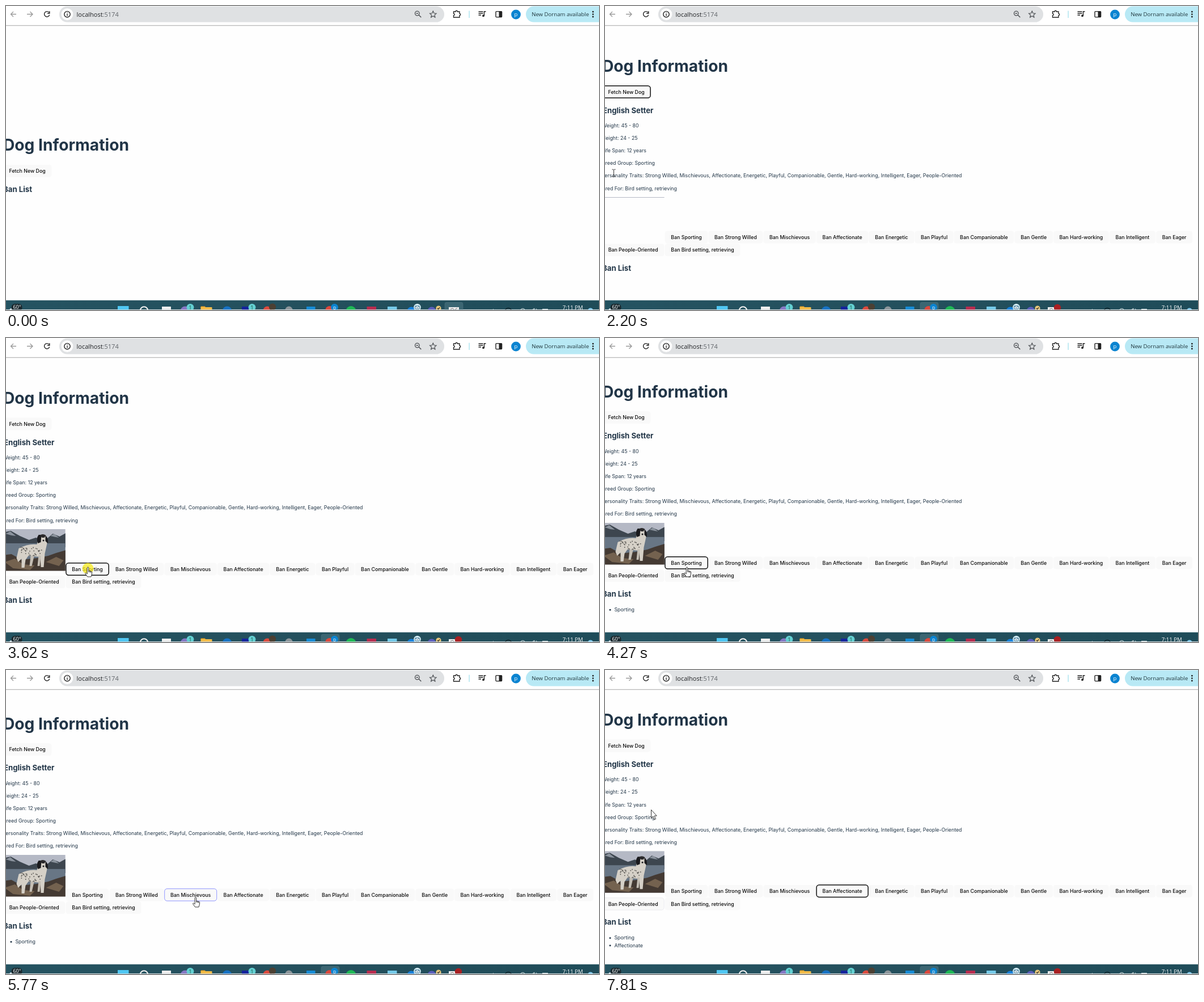
An HTML page that plays this animation: 1046 by 536 pixels, repeating every 8 s.

```html
<!DOCTYPE html>
<html lang="en">
<head>
<meta charset="utf-8">
<title>Dog Information</title>
<style>
  html, body { margin: 0; width: 100%; height: 100%; overflow: hidden; background: #fefefe; }
  svg { display: block; }
  text { font-family: Inter, sans-serif; }
  .ui text { font-family: "Open Sans", "Noto Sans", sans-serif; }
  .page text { font-size: 8.82px; fill: #213547; }
  .page .h1 { font-size: 28.2px; font-weight: 700; }
  .page .h2 { font-size: 13.2px; font-weight: 700; }
  .page .button text { font-weight: 500; fill: #0c0c0c; text-anchor: middle; }
  .end { text-anchor: end; }
  .mid { text-anchor: middle; }
  .line { fill: none; stroke: #222; stroke-width: 1.4; }
</style>
</head>
<body>
<svg id="stage" width="1046" height="536" viewBox="0 0 1046 536"></svg>
<script>
const LOOP = 8000;
const rect = (x, y, w, h, fill, rx = 0, more = '') =>
  `<rect x="${x}" y="${y}" width="${w}" height="${h}" fill="${fill}" rx="${rx}" ${more}/>`;
const disc = (x, y, r, fill, more = '') => `<circle cx="${x}" cy="${y}" r="${r}" fill="${fill}" ${more}/>`;
const text = (x, y, str, cls = '', more = '') => `<text x="${x}" y="${y}" class="${cls}" ${more}>${str}</text>`;
const path = (d, more = 'class="line"') => `<path d="${d}" ${more}/>`;

// Buttons: left, right, vertical centre, label
const buttons = [[-5.5, 80.8, 151.4, 'Fetch New Dog']];
const edges = [105.2, 181.9, 279, 372.4, 464.8, 546, 615, 721.8, 790.6, 889.2, 971.6, 1036.6];
const traits = ['Strong Willed', 'Mischievous', 'Affectionate', 'Energetic', 'Playful', 'Companionable',
  'Gentle', 'Hard-working', 'Intelligent', 'Eager', 'People-Oriented'];
['Sporting', ...traits.slice(0, -1)].forEach((name, i) =>
  buttons.push([edges[i], edges[i + 1], 407.5, 'Ban ' + name]));
buttons.push([-5.5, 104.8, 430.2, 'Ban People-Oriented']);
buttons.push([105.2, 239, 430.2, 'Ban Bird setting, retrieving']);
const FETCH = 0, SPORTING = 1, AFFECTIONATE = 4, PEOPLE = 12;

// Paragraphs: right end, text
const facts = [
  [59.5, 'Weight: 45 - 80'], [57.5, 'Height: 24 - 25'], [73, 'Life Span: 12 years'],
  [88, 'Breed Group: Sporting'], [629.5, 'Personality Traits: ' + traits.join(', ')],
  [127, 'Bred For: Bird setting, retrieving']
];
const factY = i => 211 + i * 22.06;

const buttonMarkup = ([x0, x1, y, label]) => `<g class="button">
  ${rect(x0 + .4, y - 11, x1 - x0 - .8, 22, '#f9f9f9', 4.4)}
  ${text((x0 + x1) / 2, y + 3.2, label)}</g>`;

function photo() {
  let spots = '';
  for (let i = 0; i < 34; i++) {
    const a = Math.sin(i * 12.99) * 43758.5, b = Math.sin(i * 78.23) * 12543.7;
    spots += disc(32 + (a - Math.floor(a)) * 37, 32 + (b - Math.floor(b)) * 15, .9, '#55534f');
  }
  return rect(0, 0, 110.3, 73.6, '#b5b9c5') +
    path('M0 6L14 3 30 12 46 19 58 15 74 20 88 8 100 13 111 7V32H0Z', 'fill="#3d464f"') +
    path('M5 8l8-4 10 8-8-1ZM84 12l6-4 9 7-6-1Z', 'fill="#8a929c"') +
    rect(0, 25, 110.3, 33, '#687685') +
    path('M0 46L15 44 33 54 60 51 80 47 94 42 111 37V74H0Z', 'fill="#443a33"') +
    path('M3 58l18-6 15 10 20 2-8 8-30-3ZM76 58l18-9 13 6-8 10Z', 'fill="#74624f"') +
    path('M28 34Q45 25 60 27L64 12Q70 6 77 13L78 25 74 43 72 67H67L66 49 45 47 40 54 38 68H33L33 52 27 58 24 51Z',
      'fill="#d5d0c7"') + spots +
    path('M49 47L47 65H51L55 48ZM63 46L61 65H65L67 47Z', 'fill="#c4beb4"') +
    path('M63 10Q58 17 62 25L67 23 68 10ZM75 11Q81 16 79 25L75 21Z', 'fill="#1a1a1d"') +
    path('M65 11Q70 7 76 11L73 15 69 15Z', 'fill="#2a292b"') + disc(71.5, 20, 1.5, '#1a1a1d');
}

const pageMarkup = `<g class="page" id="page">
  ${text(217, 116, 'Dog Information', 'h1 end')}
  ${buttonMarkup(buttons[FETCH])}
  <g id="details">
    ${text(85.5, 188.6, 'English Setter', 'h2 end')}
    ${facts.map(([x, str], i) => text(x, factY(i) + 3.2, str, 'end')).join('')}
    <clipPath id="loaded"><rect id="loadedRect" width="110.3" height="1"/></clipPath>
    <g transform="translate(-5.5 337)"><g clip-path="url(#loaded)">${photo()}</g></g>
    ${buttons.slice(1).map(buttonMarkup).join('')}
  </g>
  <g id="banTitle">${text(46, 0, 'Ban List', 'h2 end')}</g>
  ${['Sporting', 'Affectionate'].map((name, i) => `<g class="banned">
    ${disc(9, 490.3 + i * 13.2, 1.5, '#213547')}${text(16.4, 493.3 + i * 13.2, name)}</g>`).join('')}
  <rect id="hover" rx="4.4" fill="none" stroke="#747bff" stroke-width=".8"/>
  <rect id="trail" rx="4.4" fill="none" stroke="#e9e9ee" stroke-width=".8"/>
  <rect id="focus" rx="4.6" fill="none" stroke="#101010" stroke-width="1.5"/>
</g>`;

const toolbar = `<g class="ui">
  ${rect(0, 0, 1046, 34, '#fff')}${rect(0, 33.8, 1046, 1.3, '#b9b9b9')}
  ${path('M18 14.5H8.5M13 10L8.5 14.5 13 19', 'fill="none" stroke="#999" stroke-width="1.3"')}
  ${path('M37 14.5H47M42.5 10L47 14.5 42.5 19', 'fill="none" stroke="#999" stroke-width="1.3"')}
  ${path('M75.8 11.2A4.7 4.7 0 1 0 76.7 15.8M76.8 9.2V13H73')}
  ${rect(94, .8, 679, 27.8, '#dfe1e3', 13.9)}
  ${disc(108, 14.6, 10.4, '#fff')}${disc(108, 14.6, 5.2, 'none', 'class="line"')}
  ${path('M108 14V17.4M108 11.6V12.8')}
  ${text(124.5, 18.7, 'localhost<tspan fill="#5f6368">:5174</tspan>', '', 'font-size="11" fill="#1f2124"')}
  ${disc(725.3, 13, 3.8, 'none', 'stroke="#4b4e52" stroke-width="1.3"')}
  ${path('M728 15.8L732.3 20M723.5 13H727', 'stroke="#4b4e52" stroke-width="1.4"')}
  ${path('M753.3 9L755 12.8 759 13.2 756 15.9 756.9 20 753.3 17.8 749.7 20 750.6 15.9 747.6 13.2 751.6 12.8Z',
    'fill="none" stroke="#4b4e52" stroke-width="1.2"')}
  ${path('M789.5 10H793A1.7 1.7 0 0 1 796.4 10H800V13.4A1.7 1.7 0 0 1 800 16.8V20H789.5V16.8A1.7 1.7 0 0 0 789.5 13.4Z')}
  ${rect(816.4, 8.5, 1.4, 12.5, '#a9e3ef')}
  ${path('M833.5 10H841.5M833.5 13H841.5M833.5 16H838M843.5 17V9.7H846.5')}${disc(842, 17.2, 1.9, '#222')}
  ${rect(864, 9.6, 10.6, 10, 'none', 1, 'class="line"')}${rect(869.5, 9.5, 5, 10.2, '#222')}
  ${disc(899.5, 15, 8.4, '#0b84d1')}${text(899.5, 17.8, 'p', 'mid', 'font-size="9.5" fill="#fff"')}
  ${rect(917, .6, 150, 28, '#b8e9f5', 14)}
  ${text(927.2, 18, 'New Dornam available', '', 'font-size="9.6" fill="#20373d"')}
  ${[10.2, 14.6, 19].map(y => disc(1035.4, y, 1.4, '#222')).join('')}
</g>`;

const badge = (x, color, str, ink) => disc(x, 531.3, 6.4, color) +
  text(x, 534.5, str, 'mid', `font-size="8.5" fill="${ink}"`);
const taskbar = `<g class="ui">
  <clipPath id="bar"><rect y="518.7" width="1046" height="16.6"/></clipPath>
  <linearGradient id="teal"><stop stop-color="#245361"/><stop offset=".5" stop-color="#24505d"/>
    <stop offset="1" stop-color="#1f4c59"/></linearGradient>
  <g clip-path="url(#bar)">
    ${rect(0, 518.7, 1046, 17, 'url(#teal)')}${rect(0, 518.7, 1046, .8, '#416b76')}
    <rect id="active" y="522.6" width="32" height="18" rx="3" fill="#3b6672" stroke="#4d7480" stroke-width=".6"/>
    ${disc(10, 537, 4, '#dbe7ee')}${rect(9.5, 525, 19, 13, '#1b2a30', 6)}
    ${text(19.5, 534.3, '60°', 'mid', 'font-size="9" fill="#fff"')}
    ${rect(197, 529, 19.5, 8, '#4fc6f2')}
    ${disc(243.5, 537, 6.7, 'none', 'stroke="#f2f2f2" stroke-width="2"')}
    ${rect(275, 530, 16, 8, '#eee')}
    ${disc(316, 538, 8.5, '#8577c4')}${badge(325, '#63d0d2', 1, '#143')}
    ${rect(343.5, 529.5, 8, 4, '#e7a326', 1)}${rect(343.5, 531, 20, 8, '#f3bc48', 1)}
    ${disc(390, 538, 8.5, '#1672c4')}
    ${rect(416, 530, 12, 8, '#14239c')}${badge(434, '#63d0d2', 1, '#143')}
    ${disc(461, 537, 7.5, '#dc4a3d')}${disc(470, 530.6, 6.2, '#4b4033')}
    ${disc(499, 536, 6.5, '#8c969b')}
    ${rect(530, 530, 15.5, 8, '#168bd6')}
    ${disc(571, 537, 8, '#de473b')}${badge(579.5, '#0b84d1', 'p', '#fff')}
    ${disc(608.5, 538, 9, '#1db954')}
    ${rect(636.5, 530, 16.5, 8, '#b82c4e')}
    ${rect(673, 530, 16.5, 8, '#74c9e8')}
    ${disc(715, 538, 7.5, '#1680dc')}${disc(725.5, 531.3, 6.3, '#d8f0f8')}
    ${rect(721.8, 528.8, 7.4, 5.2, '#fff', .5, 'stroke="#185c80" stroke-width=".9"')}
    ${path('M722 529L725.5 532 729 529', 'fill="none" stroke="#185c80" stroke-width=".9"')}
    ${disc(751, 538, 7.5, '#5b5ebd')}${disc(763, 533, 4.6, '#e8c77c')}
    ${path('M761 533L762.5 534.6 765.2 531.3', 'fill="none" stroke="#222" stroke-width="1.1"')}
    ${rect(781, 531, 18, 7, '#efefef')}${path('M784 534.5L788 533 791 536 796 532.5', 'fill="none" stroke="#777"')}
    <circle id="recording" cx="798" cy="532" r="6.2" fill="#a81f22"/>
    ${disc(886, 538, 5.5, 'none', 'stroke="#10242b" stroke-width="1.5"')}
    ${disc(911.5, 538, 4.6, 'none', 'stroke="#dfe8ea" stroke-width="1"')}
    ${path('M928 536L932 533V537M935 533.5L937 536M858 536L860 534.5', 'fill="none" stroke="#dfe8ea"')}
    ${rect(946, 534, 10, 4, '#e8eef0')}
    ${text(999.7, 534.8, '7:11 PM', 'mid', 'font-size="9.6" fill="#fff"')}
    ${disc(1031, 537.5, 5, '#83cdf2')}
  </g></g>`;

const pointers = `<circle id="press" r="10" fill="#f7ea1e" opacity=".75"/>
<g id="cursor" fill="#fff" stroke="#1c1c1c" stroke-width=".9" stroke-linejoin="round">
  ${path('M0 0V14.4L3.3 11.4 5.8 17.2 8 16.2 5.6 10.6H9.8Z', 'id="arrow"')}
  ${path('M-1.3 .8a1.3 1.3 0 0 1 2.6 0V6l4.4 .9c1.2.3 1.7 1 1.5 2l-.6 4.2-1.1 3.4H-.8l-3.9-5.4c-.5-1.2.8-2 1.7-1.2l1.7 1.6ZM1.3 6V8.5M3.5 6.6V9M5.4 7V9.4',
    'id="hand"')}
  ${path('M-3-6.3H-1L0-5.5 1-6.3H3M0-5.5V5.5M-3 6.3H-1L0 5.5 1 6.3H3', 'id="beam" style="fill:none"')}
</g>`;

document.getElementById('stage').innerHTML = pageMarkup + toolbar + taskbar + pointers;
const $ = id => document.getElementById(id);
const show = (node, on) => { node.style.display = on ? '' : 'none'; };
const banned = [...document.querySelectorAll('.banned')];

// Pointer path: time, x, y
const route = [[70, 924, 529], [710, 243.5, 270], [910, 243.5, 270], [1350, 15.5, 294.5], [2340, 15.5, 294.5],
  [2740, 105, 155], [2820, 105, 155], [3040, 172, 360], [3230, 172, 360], [3530, 144.5, 404.5],
  [4270, 144.5, 404.5], [4740, 236.8, 393], [4810, 236.8, 393], [4950, 238, 412], [5080, 238, 412],
  [5290, 235, 434], [5480, 235, 434], [5840, 345, 398], [5910, 345, 398], [6040, 350, 403],
  [6310, 350, 403], [6650, 417, 395], [7180, 417, 395], [7330, 300, 426], [7530, 80, 414], [7810, 81.5, 246.5]];
const presses = [[1390, 1560], [3550, 3750], [5330, 5480], [6700, 6920]];

function pointerAt(t) {
  const next = route.findIndex(p => p[0] > t);
  if (next < 0) return route[route.length - 1].slice(1);
  if (next === 0) return [924, 560];
  const [t0, x0, y0] = route[next - 1], [t1, x1, y1] = route[next];
  const u = (t - t0) / (t1 - t0), k = u * u * (3 - 2 * u);
  return [x0 + (x1 - x0) * k, y0 + (y1 - y0) * k];
}

function frame(node, index) {
  show(node, index >= 0);
  if (index < 0) return;
  const [x0, x1, y] = buttons[index];
  const box = { x: x0 + .7, y: y - 10.7, width: x1 - x0 - 1.4, height: 21.4 };
  for (const key in box) node.setAttribute(key, box[key]);
}

function draw(t) {
  const loaded = t >= 1990;
  const shift = !loaded ? 139.4 : t < 3750 ? 0 : t < 6920 ? -11.1 : -17.8;
  $('page').setAttribute('transform', `translate(0 ${shift})`);
  $('banTitle').setAttribute('transform', `translate(0 ${loaded ? 467.2 : 188.4})`);
  show($('details'), loaded);
  $('loadedRect').setAttribute('height', Math.max(1, Math.min(1, (t - 2250) / 200) * 73.6));
  show(banned[0], t >= 3750);
  show(banned[1], t >= 6920);

  const [x, y] = pointerAt(t), py = y - shift;
  const over = buttons.findIndex(([x0, x1, by], i) =>
    (loaded || i === FETCH) && x > x0 && x < x1 && Math.abs(py - by) < 11.2);
  const focus = t < 1390 ? -1 : t < 3550 ? FETCH : t < 5330 ? SPORTING : t < 6700 ? -1 : AFFECTIONATE;
  const onText = loaded && facts.some(([end], i) => x < end && Math.abs(py - factY(i)) < 6.6);
  frame($('hover'), over === focus ? -1 : over);
  frame($('focus'), focus);
  frame($('trail'), t > 7550 && over !== PEOPLE ? PEOPLE : -1);

  show($('hand'), over >= 0);
  show($('beam'), over < 0 && onText);
  show($('arrow'), over < 0 && !onText);
  show($('cursor'), t >= 70);
  $('cursor').setAttribute('transform', `translate(${x} ${y})`);
  $('press').setAttribute('transform', `translate(${x} ${y + 2})`);
  show($('press'), presses.some(([from, to]) => t >= from && t < to));

  $('active').setAttribute('x', t < 1390 ? 774 : 556);
  show($('recording'), t >= 1390);
}

const start = performance.now();
function tick() {
  draw((performance.now() - start) % LOOP);
  requestAnimationFrame(tick);
}
tick();
</script>
</body>
</html>
```
